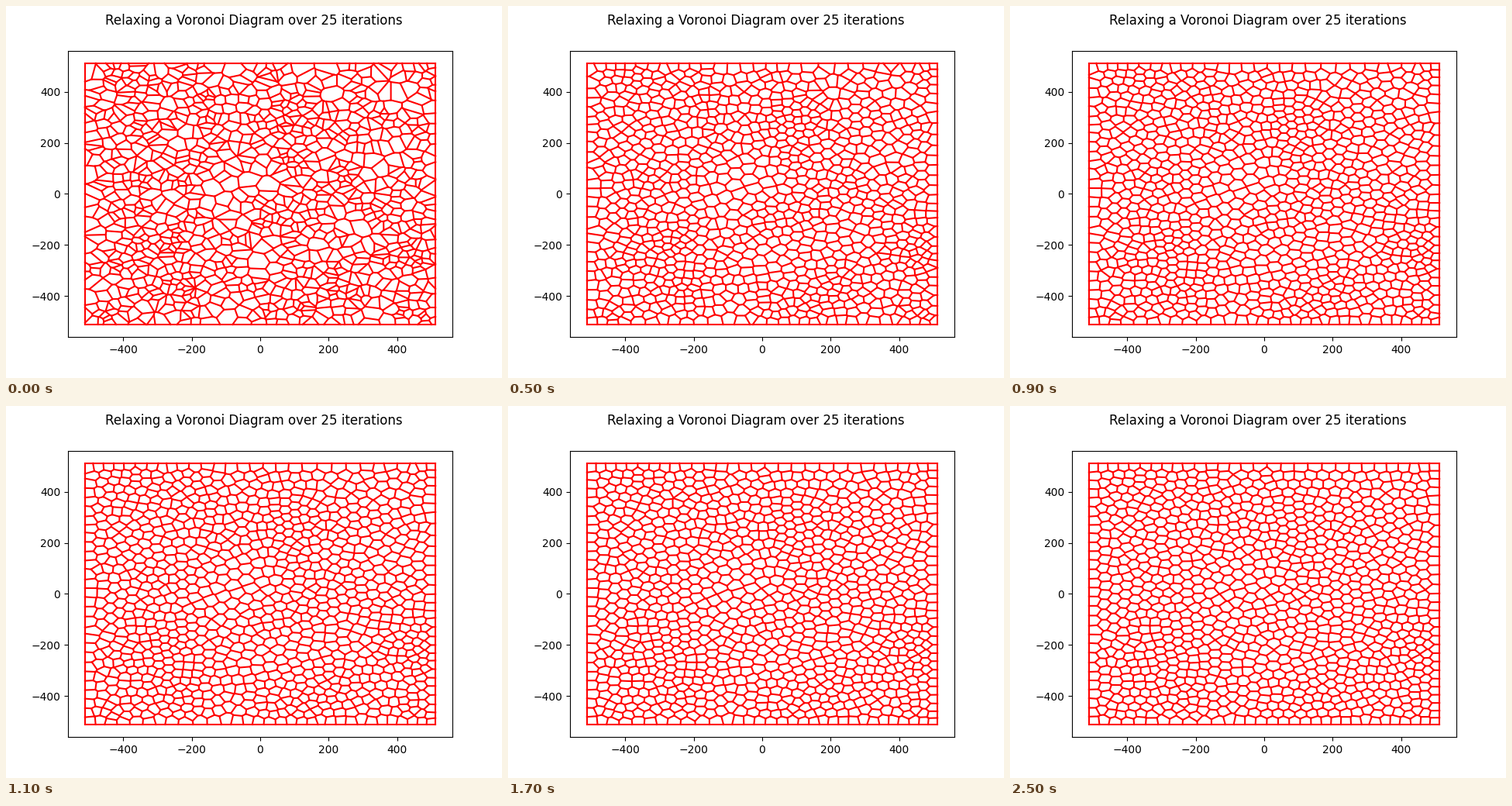
Animation of 640x480 px, one loop 2600 ms. Source, as a matplotlib script:

```python
import numpy as np
import matplotlib.pyplot as plt
from matplotlib.animation import FuncAnimation
from matplotlib.collections import LineCollection
from matplotlib.tri import Triangulation

HALF = 512
VIEW = 561.5
COUNT = 1024
ITERATIONS = 25
MIN_GAP = 11
# Sites of the largest cells in the first diagram
LARGE_CELLS = [(-143, 28), (293, -127), (-36, 56), (213, 391), (-2, -267)]
LARGE_GAP = 48


def scatter_sites():
    rng = np.random.default_rng(25)
    sites = np.array(LARGE_CELLS, float)
    gaps = np.full(COUNT, MIN_GAP)
    gaps[:len(sites)] = LARGE_GAP
    while len(sites) < COUNT:
        site = rng.uniform(-HALF, HALF, 2)
        distances = np.linalg.norm(sites - site, axis=1)
        if (distances > gaps[:len(sites)]).all():
            sites = np.vstack([sites, site])
    return sites


def with_mirrors(sites):
    """Mirror the sites in all four walls, so the walls become cell edges."""
    parts = [sites]
    for axis in (0, 1):
        for wall in (-HALF, HALF):
            mirrored = sites.copy()
            mirrored[:, axis] = 2 * wall - mirrored[:, axis]
            parts.append(mirrored)
    return np.vstack(parts)


def cross(a, b):
    return a[:, 0] * b[:, 1] - a[:, 1] * b[:, 0]


def circumcentres(points, triangles):
    a, b, c = (points[triangles[:, i]] for i in range(3))
    b, c = b - a, c - a
    bb, cc = (b ** 2).sum(axis=1), (c ** 2).sum(axis=1)
    offset = np.column_stack([c[:, 1] * bb - b[:, 1] * cc,
                              b[:, 0] * cc - c[:, 0] * bb])
    return a + offset / (2 * cross(b, c))[:, None]


def voronoi(sites):
    """Return the cell edges inside the box and the centroid of each cell."""
    points = with_mirrors(sites)
    mesh = Triangulation(points[:, 0], points[:, 1])
    triangles, neighbors = mesh.triangles, mesh.neighbors
    centres = circumcentres(points, triangles)

    tri, side = np.nonzero(neighbors > np.arange(len(triangles))[:, None])
    owners = np.column_stack([triangles[tri, side],
                              triangles[tri, (side + 1) % 3]])
    inside = (owners < COUNT).any(axis=1)
    tri, side, owners = tri[inside], side[inside], owners[inside]
    start = np.clip(centres[tri], -HALF, HALF)
    end = np.clip(centres[neighbors[tri, side]], -HALF, HALF)

    area = np.zeros(COUNT)
    moment = np.zeros((COUNT, 2))
    for owner in owners.T:
        own = owner < COUNT
        idx, p, q = owner[own], start[own], end[own]
        site = sites[idx]
        weight = np.abs(cross(p - site, q - site))
        np.add.at(area, idx, weight)
        np.add.at(moment, idx, weight[:, None] * (site + p + q) / 3)

    edges = np.stack([start, end], axis=1)
    visible = np.linalg.norm(end - start, axis=1) > 1e-3
    return edges[visible], moment / area[:, None]


def relax(sites):
    diagrams = []
    for _ in range(ITERATIONS + 1):
        edges, sites = voronoi(sites)
        diagrams.append(edges)
    return diagrams


diagrams = relax(scatter_sites())

fig, ax = plt.subplots(figsize=(6.4, 4.8), dpi=100)
fig.suptitle(f"Relaxing a Voronoi Diagram over {ITERATIONS} iterations")
ax.set_xlim(-VIEW, VIEW)
ax.set_ylim(-VIEW, VIEW)
lines = LineCollection([], colors="red", linewidths=1.5, capstyle="projecting")
ax.add_collection(lines, autolim=False)


def update(frame):
    lines.set_segments(diagrams[frame])
    return [lines]


anim = FuncAnimation(fig, update, frames=ITERATIONS + 1, interval=100,
                     repeat=True, repeat_delay=0)
plt.show()
```
